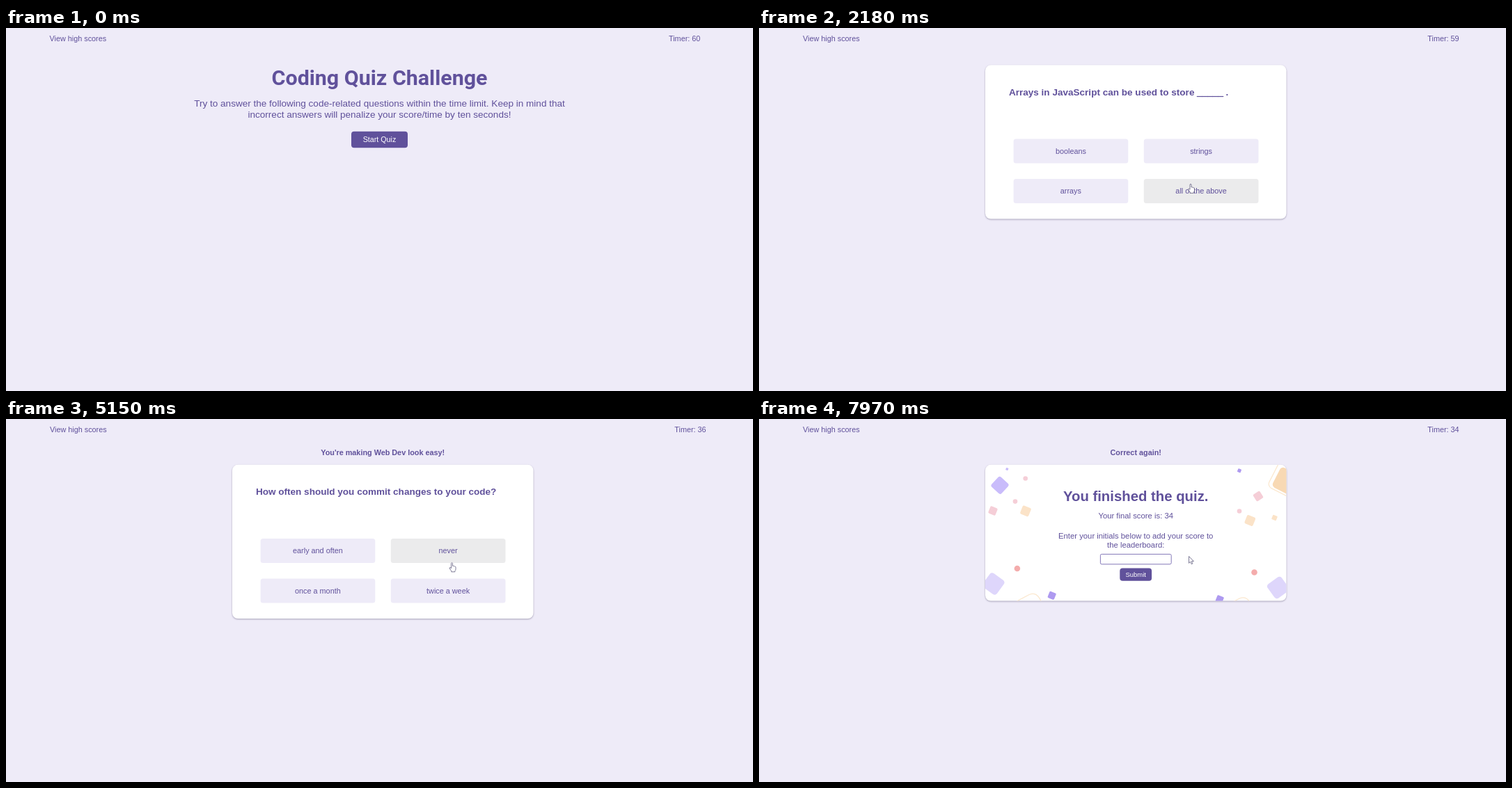
These frames come from a looping animation (1073x522 px, 8000 ms). An HTML page:

```html
<!DOCTYPE html>
<html lang="en">
<head>
<meta charset="utf-8">
<title>Coding Quiz</title>
<style>
  html, body { margin: 0; width: 100%; height: 100%; overflow: hidden; background: #eeebf8; }
  svg { display: block; width: 1073px; height: 522px; font-family: "Liberation Sans", Arial, sans-serif; font-size: 10.84px; fill: #60519b; }
  .bold { font-weight: bold; }
  .mid { text-anchor: middle; }
  .title { font-family: Roboto, "Liberation Sans", sans-serif; }
  .blank { stroke: #60519b; stroke-width: .7; }
  .card { fill: #fff; filter: drop-shadow(0 1px 1.2px rgba(40, 30, 70, .36)); }
  .line { fill: none; stroke: #fbe8cf; stroke-width: 1.3; }
  #cursor path { fill: #fff; stroke: #5f5b7d; stroke-width: .8; stroke-linejoin: round; }
</style>
</head>
<body>
<svg id="stage" viewBox="0 0 1073 522">
  <defs><clipPath id="clip"><rect x="325" y="66" width="432.5" height="195.5" rx="8"/></clipPath></defs>
</svg>
<script>
const LOOP = 8000;
const MID = 541.2;
const stage = document.getElementById('stage');

function add(parent, tag, attrs, text) {
  const el = document.createElementNS('http://www.w3.org/2000/svg', tag);
  for (const k in attrs) el.setAttribute(k, attrs[k]);
  if (text) el.textContent = text;
  parent.appendChild(el);
  return el;
}
const label = (g, x, y, text, size = 10.84, cls = 'mid', fill = '#60519b') =>
  add(g, 'text', { x, y, class: cls, fill, style: `font-size:${size}px` }, text);
const box = (g, x, y, width, height, rx, fill, cls = '') =>
  add(g, 'rect', { x, y, width, height, rx, fill, class: cls });
const path = (g, d, cls = '') => add(g, 'path', { d, class: cls });
const card = (g, top, height, fill) => box(g, 325, top, 432.5, height, 8, fill, 'card');
const praise = (g, text) => label(g, MID, 51.8, text, 10.84, 'bold mid');

// Bold line whose run of underscores is drawn heavier
function prompt(g, x, y, text) {
  const line = label(g, x, y, '', 13.55, 'bold');
  text.split(/(_+)/).forEach(part =>
    add(line, 'tspan', { class: part[0] === '_' ? 'blank' : '' }, part));
}

const link = label(stage, 62.5, 18.8, 'View high scores', 10.84, '');
const timer = label(stage, 952, 18.8, '', 10.84, '');

function startScreen(since) {
  const g = add(stage, 'g', {});
  const zone = [496, 148.7, 81, 23.6];
  label(g, 536.5, 82, 'Coding Quiz Challenge', 30.4, 'bold mid title');
  label(g, 536.5, 112.5, 'Try to answer the following code-related questions within the time limit. Keep in mind that', 13.55);
  label(g, 536.5, 128.5, 'incorrect answers will penalize your score/time by ten seconds!', 13.55);
  box(g, ...zone, 4, '#60519b');
  label(g, 536.5, 164, 'Start Quiz', 10.7, 'mid', '#fff');
  return { since, g, buttons: [], zones: [zone] };
}

function question(since, feedback, lines, answers) {
  const g = add(stage, 'g', {});
  const top = feedback ? 65.8 : 53.3;
  const extra = (lines.length - 1) * 16;
  praise(g, feedback);
  card(g, top, 221.3 + extra, '#fff');
  lines.forEach((s, i) => prompt(g, i ? 355.3 : 358.9, top + 43.4 + i * 16, s));
  const zones = answers.map((_, i) =>
    [365.6 + 187.2 * (i % 2), top + 106.2 + extra + 57.6 * (i >> 1), 164.7, 35]);
  const buttons = zones.map((zone, i) => {
    const b = box(g, ...zone, 3.5, '#eeebf8');
    label(g, zone[0] + 82.3, zone[1] + 21.2, answers[i]);
    return b;
  });
  return { since, g, buttons, zones };
}

function confetti(g) {
  const lilac = '#c9bcfb', violet = '#ae9af0', pink = '#f5ced7', peach = '#fbe3c8';
  const tile = (x, y, s, fill, turn = 22) =>
    add(g, 'rect', { x: x - s / 2, y: y - s / 2, width: s, height: s, rx: s / 6, fill, transform: `rotate(${turn} ${x} ${y})` });
  const dot = (cx, cy, r, fill) => add(g, 'circle', { cx, cy, r, fill });

  // The lower corners mirror each other, the right one a little lower
  for (const side of [-1, 1]) {
    const y = side > 0 ? 5.5 : 0;
    tile(MID + 204.5 * side, 237 + y, 25, '#ded6fb', -36 * side);
    tile(MID + 120.5 * side, 253.8 + y, 10, violet);
    dot(MID + 170.3 * side, 215 + y, 4.3, '#f4acac');
    const x = MID + 151 * side;
    path(g, `M${x - 20} ${262 + y}L${x - 2} ${252.5 + y}Q${x + 9} ${248 + y} ${x + 15} ${262 + y}`, 'line');
  }
  tile(346, 95.3, 19.5, lilac, 43);
  tile(356.3, 72, 3.5, lilac);
  tile(690, 74.2, 5, violet);
  tile(336, 132, 11, pink);
  tile(717, 111, 11.5, pink, 58);
  tile(383, 132.3, 13, peach);
  tile(705.3, 146, 13, peach);
  tile(740.5, 142, 7, peach);
  dot(382.7, 85.5, 3.3, pink);
  dot(368, 118.6, 3.3, pink);
  dot(690, 132.5, 3.3, pink);
  tile(757.5, 89.5, 32, '#f8d9b4', 27);
  tile(757.5, 87.5, 41, 'none', 27).setAttribute('class', 'line');
}

function endScreen(since) {
  const g = add(stage, 'g', {});
  praise(g, 'Correct again!');
  card(g, 65.8, 195.7, '#fdfefe');
  confetti(add(g, 'g', { 'clip-path': 'url(#clip)' }));
  label(g, MID, 118, 'You finished the quiz.', 20.33, 'bold mid');
  label(g, MID, 142.6, 'Your final score is: 34', 11.3);
  label(g, MID, 172.4, 'Enter your initials below to add your score to', 11.3);
  label(g, MID, 185.4, 'the leaderboard:', 11.3);
  box(g, 490.4, 194.4, 101.8, 14.4, 2, '#fff').setAttribute('stroke', '#8378b8');
  box(g, 518.3, 214.6, 45.8, 18.2, 4, '#60519b');
  label(g, MID, 227, 'Submit', 9.5, 'mid', '#fff');
  return { since, g, buttons: [], zones: [] };
}

const screens = [
  startScreen(0),
  question(1220, '', ['Arrays in JavaScript can be used to store _____ .'],
    ['booleans', 'strings', 'arrays', 'all of the above']),
  question(2340, 'Take your time. You got this!',
    ['The condition in an if/ else statement is enclosed within', '_____ .'],
    ['quotes', 'curly brackets', 'parentheses', 'square brackets']),
  question(3540, 'Nice try!',
    ['A very useful tool used during development and', 'debugging for printing content to the debugger is _____ .'],
    ['JavaScript', 'console.log', 'terminal', 'Tarnix Pages']),
  question(4830, "You're making Web Dev look easy!", ['How often should you commit changes to your code?'],
    ['early and often', 'never', 'once a month', 'twice a week']),
  question(6350, 'Great job!', ['Commonly used data types do not include _____ .'],
    ['strings', 'alerts', 'booleans', 'numbers']),
  endScreen(7320)
];

// Pointer stops: arrival time, x, y and rest before moving on
const stops = [
  [500, 629, 222, 0], [980, 529, 165, 400], [1650, 450, 195, 0], [2180, 620, 224, 240],
  [2700, 426, 232, 0], [3060, 637.5, 248, 0], [3300, 655.5, 212, 570], [4190, 545.3, 212, 0],
  [4400, 474, 255, 0], [4750, 638, 203, 0], [5150, 640.5, 206.4, 480], [5950, 461, 188, 0],
  [6190, 491, 186, 490], [6880, 475, 215, 0], [7320, 617.5, 197.5, 0]
];

const cursor = add(stage, 'g', { id: 'cursor' });
const arrow = path(cursor, 'M0 0V9.8L2.2 7.7L3.7 11.2L5.3 10.5L3.9 7.1H6.9Z');
const hand = path(cursor, 'M-1 1Q0 -.6 1 1V5Q2 4.2 2.8 5.3Q3.8 4.8 4.3 5.8Q5.6 5.6 5.5 7V9.5Q5.4 11.5 4.4 12V13.4H-.8V12L-3.3 8.6Q-3.8 7 -2.4 7.2L-1 8.3Z');

const clamp = (v, lo, hi) => Math.min(hi, Math.max(lo, v));
const show = (el, on) => { el.style.display = on ? '' : 'none'; };

function pointer(t) {
  const next = stops.findIndex(s => s[0] > t);
  const i = next < 0 ? stops.length - 1 : Math.max(1, next);
  const [t0, x0, y0, rest] = stops[i - 1], [t1, x1, y1] = stops[i];
  const f = clamp((t - t0 - rest) / (t1 - t0 - rest), 0, 1);
  const ease = f * f * (3 - 2 * f);
  return [x0 + (x1 - x0) * ease, y0 + (y1 - y0) * ease];
}

// One tick a second; the wrong answer is charged at the third tick
function secondsLeft(t) {
  const k = clamp(Math.floor((t - 1160) / 995), 0, 6);
  return 60 - k - (k >= 3 ? 20 : 0);
}

function render(t) {
  const screen = screens.filter(s => s.since <= t).pop();
  screens.forEach(s => show(s.g, s === screen));
  link.setAttribute('x', screen.since ? 63 : 62.5);
  timer.setAttribute('x', screen.since ? 960.3 : 952);
  timer.textContent = 'Timer: ' + secondsLeft(t);

  const [x, y] = pointer(t);
  const over = screen.zones.findIndex(([bx, by, w, h]) =>
    x >= bx && x <= bx + w && y >= by && y <= by + h);
  screen.buttons.forEach((b, i) => b.setAttribute('fill', i === over ? '#ebebec' : '#eeebf8'));
  // The pointer stays an arrow briefly after a page change
  const pointing = over >= 0 && t - screen.since >= 160;
  show(cursor, t >= 500);
  show(hand, pointing);
  show(arrow, !pointing);
  cursor.setAttribute('transform', `translate(${x} ${y})`);
}

const begin = performance.now();
function loop() {
  render((performance.now() - begin) % LOOP);
  requestAnimationFrame(loop);
}
loop();
</script>
</body>
</html>
```
